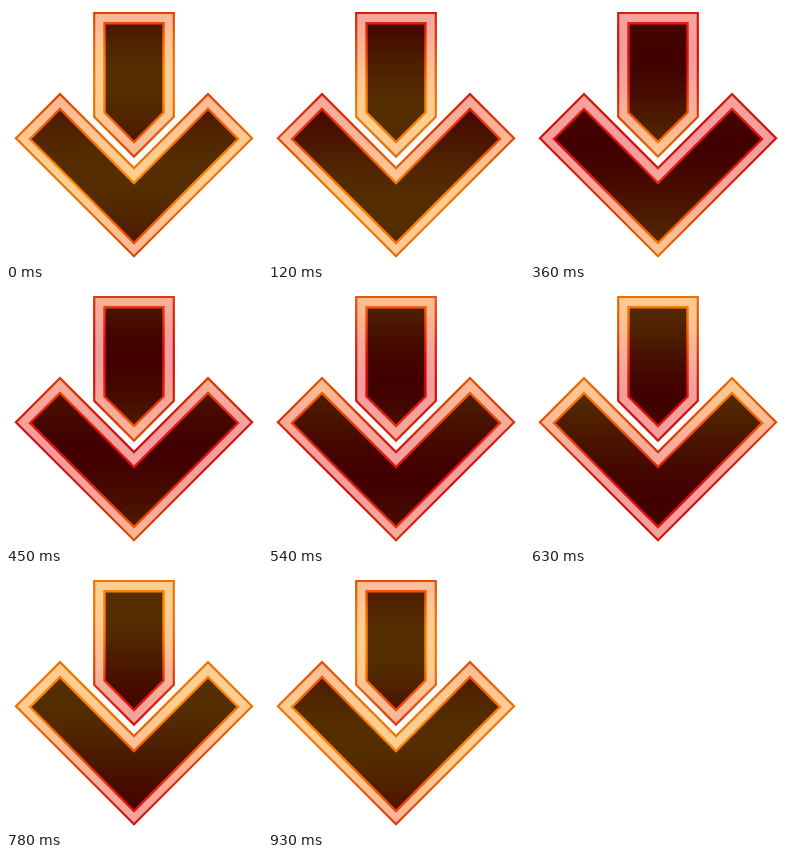
Animation, 256 px wide and 256 px high, one loop 960 ms. Source, as an HTML page:

```html
<!DOCTYPE html>
<html lang="en">
<head>
<meta charset="utf-8">
<title>Down arrow</title>
<style>
  html, body { margin: 0; width: 100%; height: 100%; overflow: hidden; background: #fff; }
  svg { display: block; width: 100vw; height: 100vh; }
</style>
</head>
<body>
<svg viewBox="0 0 256 256">
  <defs id="defs"></defs>
  <g fill="url(#band)" stroke="url(#edge)" stroke-width="2.2">
    <path d="M88.2 7H167.8V110.8L128 150.6L88.2 110.8Z"/>
    <path d="M9.9 132.2L54 88.1L128 162.1L202 88.1L246.1 132.2L128 250.3Z"/>
  </g>
  <g fill="url(#core)" stroke="url(#line)" stroke-width="2.4">
    <path d="M98.5 17.3H157.5V106.5L128 136L98.5 106.5Z"/>
    <path d="M24 133L54 103L128 177L202 103L232 133L128 237Z"/>
  </g>
</svg>
<script>
const LOOP = 960, STEP = 30, STOPS = 12;
const NS = 'http://www.w3.org/2000/svg';

// Each layer blends from its red to its orange.
const layers = {
  edge: [[208, 16, 12], [236, 120, 4]],
  band: [[244, 158, 158], [255, 206, 146]],
  line: [[222, 14, 14], [255, 132, 0]],
  core: [[66, 1, 0], [84, 46, 0]]
};

function add(parent, tag, attrs) {
  const el = document.createElementNS(NS, tag);
  for (const key in attrs) el.setAttribute(key, attrs[key]);
  return parent.appendChild(el);
}

// Gradients span the height of each shape they paint.
const defs = document.getElementById('defs');
const stops = [];
for (const id in layers) {
  const grad = add(defs, 'linearGradient', { id, x1: 0, y1: 0, x2: 0, y2: 1 });
  for (let i = 0; i <= STOPS; i++) {
    const pos = i / STOPS;
    stops.push({ el: add(grad, 'stop', { offset: pos }), pos, colors: layers[id] });
  }
}

const mix = ([from, to], k) =>
  `rgb(${from.map((c, i) => Math.round(c + (to[i] - c) * k)).join(',')})`;

// A warm wave travels down, half a wavelength per shape.
function draw(ms) {
  const t = Math.floor((ms % LOOP) / STEP) * STEP / LOOP;
  for (const { el, pos, colors } of stops) {
    const warmth = 0.5 + 0.5 * Math.cos(2 * Math.PI * (t - 0.75 - pos / 2));
    el.setAttribute('stop-color', mix(colors, warmth));
  }
}

const start = performance.now();
function tick() {
  draw(performance.now() - start);
  requestAnimationFrame(tick);
}
tick();
</script>
</body>
</html>
```
